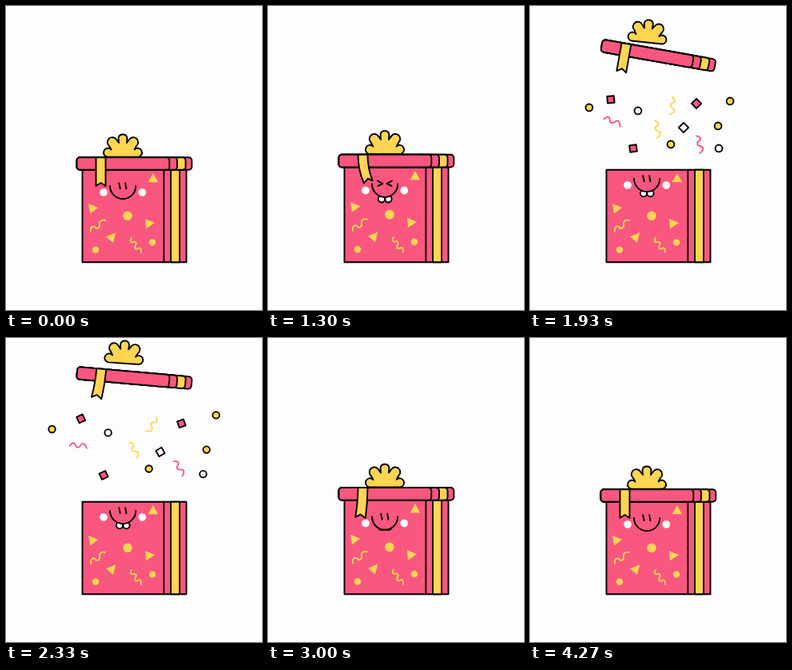
An HTML page for the animation above (5010 ms loop, 320 by 380 pixels).

```html
<!DOCTYPE html>
<html lang="en">
<head>
<meta charset="utf-8">
<title>Gift box</title>
<style>
html, body { margin: 0; width: 100%; height: 100%; overflow: hidden; background: #fdfdfd; }
svg { display: block; width: 100%; height: 100%; }
.ink { stroke: #000; stroke-width: 1.9; stroke-linejoin: round; stroke-linecap: round; }
.pink { fill: #f9577f; }
.gold { fill: #ffd552; }
.white { fill: #fff; }
.none { fill: none; }
.wave { fill: none; stroke-width: 1.9; stroke-linecap: round; stroke-linejoin: round; }
</style>
</head>
<body>
<svg viewBox="0 0 320 380">
  <g id="confetti"></g>
  <g id="box">
    <path class="ink pink" d="M95.5 204.7H225.5V320.3H95.5Z"/>
    <path class="ink gold" d="M206 204.7H217V320.3H206Z"/>
    <path class="ink" d="M197.3 204.7V320.3"/>
    <g class="gold">
      <path d="M177.5 220.3L184 209 190 220.3ZM103 247L115.3 252 105.2 259.5ZM174 266L186 271 175 278.5ZM125 288.3L137.3 283.2 134 296Z"/>
      <circle cx="152" cy="262.3" r="5.8"/>
      <circle cx="112" cy="304.7" r="4.2"/>
      <circle cx="183" cy="295.5" r="4.2"/>
    </g>
    <path class="wave" stroke="#ffd552" d="M106 282c-1-8 5-7 6-5s6 1 5-4 4-6 7-5M157 290c-3 4 0 6 2 5s5 1 3 4 0 6 3 4 4 1 4 5"/>
    <g id="face">
      <circle class="white" cx="122" cy="233" r="4.8"/>
      <circle class="white" cx="170.3" cy="233" r="4.8"/>
      <g id="teeth" class="ink white">
        <circle cx="142" cy="243.3" r="4.1"/>
        <circle cx="150.5" cy="243.3" r="4.1"/>
      </g>
      <path class="ink pink" stroke-linecap="round" d="M130 225A16.1 16.1 0 0 0 162.2 225"/>
      <path id="open" class="ink none" d="M141.2 221.3L142.7 228.3M149.2 221.3L150.4 228.3"/>
      <path id="shut" class="ink none" d="M137 221.2L143.5 224.8 137.5 227.3M155 221.2L148.5 224.8 154.5 227.3"/>
    </g>
  </g>
  <g id="bow">
    <path class="ink gold" d="M127 188.7A5.5 5.5 0 1 1 131.5 179.5L129 175A6.1 6.1 0 1 1 138 167L141 171 140.5 165A5.6 5.6 0 0 1 151.5 165L151 171 154 167A6.1 6.1 0 1 1 163 175L160.5 179.5A5.5 5.5 0 1 1 165 188.7Z"/>
  </g>
  <g id="lid">
    <g id="bands"></g>
    <path id="ribbon" class="ink gold"/>
  </g>
</svg>
<script>
const LOOP = 5010;
const $ = id => document.getElementById(id);
const clamp = u => Math.max(0, Math.min(1, u));
const ease = {
  io: u => (1 - Math.cos(Math.PI * u)) / 2,
  out: u => 1 - (1 - u) ** 3,
  outQ: u => 1 - (1 - u) ** 2,
  in: u => u * u,
  lin: u => u
};

// Keys are [time, value, easing into this key].
function track(t, keys) {
  if (t <= keys[0][0]) return keys[0][1];
  for (let i = 1; i < keys.length; i++) {
    const [t0, v0] = keys[i - 1], [t1, v1, e = 'io'] = keys[i];
    if (t < t1) return v0 + (v1 - v0) * ease[e]((t - t0) / (t1 - t0));
  }
  return keys[keys.length - 1][1];
}

function add(parent, tag, attrs) {
  const el = document.createElementNS('http://www.w3.org/2000/svg', tag);
  for (const k in attrs) el.setAttribute(k, attrs[k]);
  parent.appendChild(el);
  return el;
}

// Nested rounded bands give the lid its curved dividers.
for (const [right, tone] of [[232.3, 'pink'], [224.5, 'gold'], [214, 'pink'], [204.3, 'pink']])
  add($('bands'), 'rect', { class: 'ink ' + tone, x: 88.5, y: 189.3, width: right - 88.5, height: 15.4, rx: 4 });

const shapes = {
  square: ['rect', { x: -4.3, y: -4.3, width: 8.6, height: 8.6 }],
  dot: ['circle', { r: 4.4 }],
  wave: ['path', { d: 'M-1 -11c5 2 6 5 2 7s-3 5 1 7 2 6-3 8' }]
};

// shape, colour, early x/y, later x/y, angle, spin
const bits = [
  ['square', 'pink', 118, 154, 101, 117, -5, 45],
  ['square', 'pink', 182, 157, 208, 122, 45, -58],
  ['square', 'white', 190, 174, 192, 152, 45, -35],
  ['square', 'pink', 145, 193, 129, 178, -8, 40],
  ['dot', 'gold', 112, 157, 74, 127, 0, 0],
  ['dot', 'white', 152, 160, 135, 131, 0, 0],
  ['dot', 'gold', 221, 171, 250, 119, 0, 0],
  ['dot', 'gold', 199, 174, 235, 150, 0, 0],
  ['dot', 'gold', 170, 195, 176, 173, 0, 0],
  ['dot', 'white', 212, 196, 236, 178, 0, 0],
  ['wave', 'pink', 132, 167, 103, 145, -65, 40],
  ['wave', 'gold', 165, 164, 177, 125, 8, -60],
  ['wave', 'gold', 155, 186, 158, 154, -8, 40],
  ['wave', 'pink', 200, 196, 211, 173, -12, 40]
].map(([shape, tone, x0, y0, x1, y1, angle, spin]) => {
  const [tag, attrs] = shapes[shape];
  const look = shape === 'wave'
    ? { class: 'wave', stroke: tone === 'pink' ? '#f9577f' : '#ffd552' }
    : { class: 'ink ' + tone };
  return { el: add($('confetti'), tag, { ...attrs, ...look }), x0, y0, x1, y1, angle, spin };
});

const squash = [[470, 1], [710, .753], [930, 1.16], [1190, .76], [1350, 1.1], [1570, 1.035],
  [1750, 1], [1810, .95], [1900, 1], [2685, 1], [2790, .83], [2930, 1.04], [3060, 1]];
const hop = [[1380, 0], [1570, -26, 'outQ'], [1760, 0, 'in']];
const tilt = [[1380, 0], [1510, 5], [1570, 4.4], [1760, 0]];
const lidY = [[1320, 0], [1570, -128.5, 'out'], [1930, -135, 'lin'], [2330, -147, 'outQ'], [2676, 0, 'in']];
const lidTilt = [[1330, 0], [1530, 13], [1570, 13], [1930, 10], [2330, 5], [2670, .7], [2700, 0]];
const bowY = [[1320, 0], [1570, -133, 'out'], [1930, -143, 'lin'], [2330, -157, 'outQ'], [2690, 0, 'in']];
const bowX = [[1330, 0], [1570, 4], [1930, 1.5], [2670, 2.3], [2720, 0]];
const bowTilt = [[1330, 0], [1570, 14], [1930, 6], [2330, 4], [2640, 9], [2670, 9], [2720, 0]];
const bend = [[470, 0], [700, 1], [930, -.2], [1190, 1], [1400, 0], [1570, .3], [1930, 0],
  [2330, -.2], [2520, .1], [2670, 1.4], [2840, .7], [3000, -.2], [3120, 0]];
const faceY = [[1320, 0], [1430, -9], [2700, -9], [2860, 0]];
const teeth = [[500, 0], [600, 1], [2900, 1], [3050, 0]];

const between = (t, a, b) => t >= a && t < b;

function ribbonPath(b) {
  const lx = 112.5 + 16.5 * b, ly = 225 - 2 * b;
  const rx = 124.5 + 13.5 * b, ry = 225 - 9 * b;
  const nx = (lx + rx) / 2 - b, ny = (ly + ry) / 2 - 4;
  return `M112.5 189.3Q${112.5 + b} ${209 + 3 * b} ${lx} ${ly}L${nx} ${ny} ${rx} ${ry}Q124.5 ${207 - 2 * b} 124.5 189.3Z`;
}

function draw(t) {
  const set = (id, v) => $(id).setAttribute('transform', v);
  const stretch = s => `translate(0 ${320 * (1 - s)}) scale(1 ${s})`;
  const s = track(t, squash);
  const loose = between(t, 1350, 2676) ? clamp((t - 1350) / 120) : 0;
  const top = stretch(1 + (s - 1) * (1 - loose));

  set('box', `translate(0 ${track(t, hop)}) rotate(${track(t, tilt)} 160 320) ${stretch(s)}`);
  set('lid', `translate(0 ${track(t, lidY)}) rotate(${track(t, lidTilt)} 160.5 197) ${top}`);
  set('bow', `translate(${track(t, bowX)} ${track(t, bowY)}) rotate(${track(t, bowTilt)} 146 174) ${top}`);
  $('ribbon').setAttribute('d', ribbonPath(track(t, bend)));

  set('face', `translate(0 ${track(t, faceY)})`);
  const bite = track(t, teeth);
  set('teeth', `translate(0 ${-8 * (1 - bite)})`);
  $('teeth').style.display = bite > 0 ? '' : 'none';
  const squint = between(t, 540, 900) || between(t, 1050, 1350) || between(t, 2600, 2920);
  $('shut').style.display = squint ? '' : 'none';
  $('open').style.display = squint ? 'none' : '';

  const size = track(t, [[1450, 0], [1550, 1], [2300, 1], [2560, 0]]);
  $('confetti').style.display = size > 0 ? '' : 'none';
  const k = 1.685 * (1 - Math.exp((1570 - t) / 400));
  if (size > 0) for (const b of bits) {
    const x = b.x0 + (b.x1 - b.x0) * k, y = b.y0 + (b.y1 - b.y0) * k;
    b.el.setAttribute('transform', `translate(${x} ${y}) rotate(${b.angle + b.spin * (1 - k)}) scale(${size})`);
  }
}

const start = performance.now();
function tick() {
  draw((performance.now() - start) % LOOP);
  requestAnimationFrame(tick);
}
tick();
</script>
</body>
</html>
```
